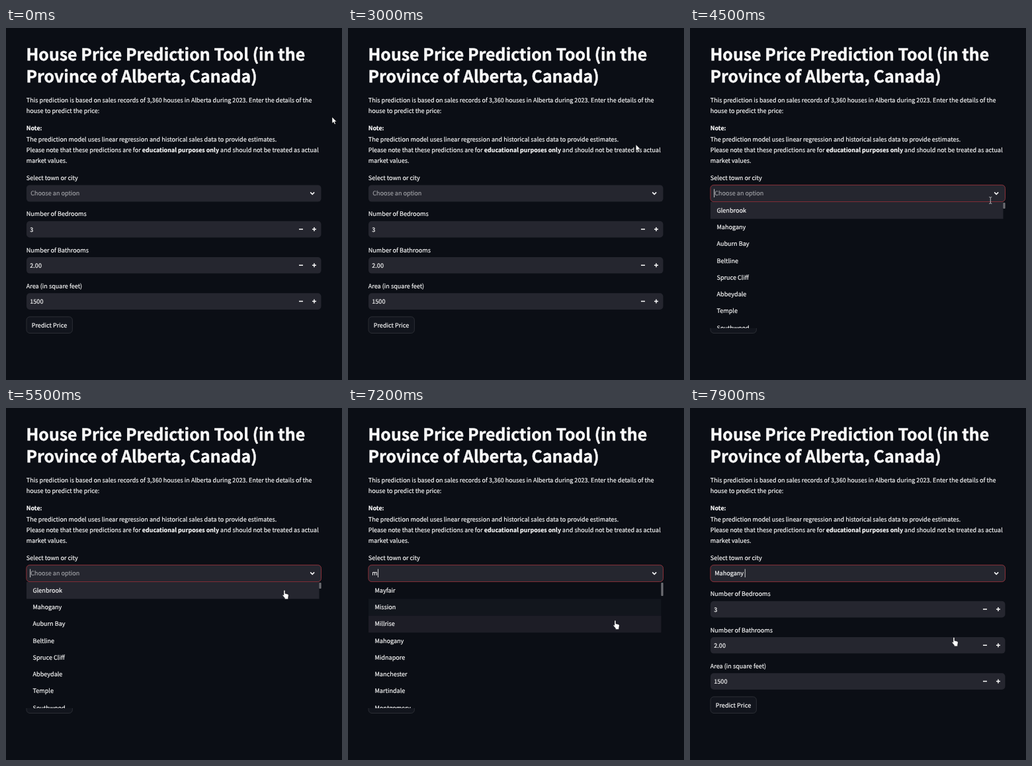
Animation, 508 px wide and 530 px high, one loop 8 s. Source, as an HTML page:

```html
<!DOCTYPE html>
<html lang="en">
<head>
<meta charset="utf-8">
<title>House price form</title>
<style>
  html, body { margin: 0; width: 100%; height: 100%; overflow: hidden; background: #0b0e15; }
  svg { display: block; }
  text { font: 9.08px "Noto Sans CJK JP", "Noto Sans CJK SC", "Noto Sans CJK", sans-serif; fill: #fafafa; stroke: #fafafa; stroke-width: .18; text-rendering: geometricPrecision; }
  .title { font-size: 24.94px; font-weight: 700; stroke-width: .45; }
  .bold { font-size: 8.95px; font-weight: 700; }
  .field { fill: #25262f; }
  .icon { fill: none; stroke: #fafafa; stroke-width: 1.5; }
</style>
</head>
<body>
<svg id="stage" width="508" height="530" viewBox="0 0 508 530"></svg>
<script>
const LOOP = 8000, FOCUS = 4400, OPEN = 4500, TYPED = 6000, CHOSEN = 7900;
const ROW = 25.4, LIST_TOP = 262;

const text = (x, y, s, attrs = '') => `<text x="${x}" y="${y}" ${attrs}>${s}</text>`;
const box = (x, y, w, h, attrs) => `<rect x="${x}" y="${y}" width="${w}" height="${h}" ${attrs}/>`;

const numberField = (y, label, value) =>
  text(30.8, y - 7.4, label) +
  box(31, y, 445.5, 24.6, 'rx="5" class="field"') +
  text(36.3, y + 15.9, value) +
  `<path class="icon" d="M443 ${y + 12.3}h6M463 ${y + 12.3}h6m-3 -3v6"/>`;

const options = (id, names) => `<g id="${id}">` +
  names.split(',').map((name, i) => text(40.5, 277.6 + i * 25.3, name)).join('') + '</g>';

const stage = document.getElementById('stage');
stage.innerHTML =
  text(30.4, 48.6, 'House Price Prediction Tool (in the', 'class="title"') +
  text(30.4, 81.8, 'Province of Alberta, Canada)', 'class="title"') +
  text(30.8, 111.5, 'This prediction is based on sales records of 3,360 houses in Alberta during 2023. Enter the details of the') +
  text(30.8, 127.8, 'house to predict the price:') +
  text(30.8, 154, 'Note:', 'class="bold"') +
  text(30.8, 170.6, 'The prediction model uses linear regression and historical sales data to provide estimates.') +
  text(30.8, 186.8, 'Please note that these predictions are for <tspan class="bold">educational purposes only</tspan> and should not be treated as actual') +
  text(30.8, 203, 'market values.') +
  text(30.8, 229, 'Select town or city') +
  numberField(290.8, 'Number of Bedrooms', '3') +
  numberField(345, 'Number of Bathrooms', '2.00') +
  numberField(399.3, 'Area (in square feet)', '1500') +
  box(31, 434.8, 69.4, 24.7, 'rx="5" fill="#12151d" stroke="#33353c" stroke-width=".8"') +
  text(38.7, 450.8, 'Predict Price') +
  box(30.9, 236.4, 445.6, 25.2, 'id="select" rx="5" class="field" stroke-width=".8"') +
  text(37.3, 252.3, '', 'id="value"') +
  box(0, 242.5, .8, 12.5, 'id="caret" fill="#fafafa"') +
  '<path class="icon" d="M460.2 247.4l3 3l3 -3"/>' +
  `<clipPath id="clip">${box(30, LIST_TOP, 448, 190)}</clipPath>
  <g id="list" clip-path="url(#clip)">
    ${box(30, LIST_TOP, 448, 190, 'fill="#0b0e15"')}
    ${[0, 1, 2, 3].map(i => box(31, LIST_TOP + i * ROW, 442.5, ROW, 'class="field hover"')).join('')}
    ${options('all', 'Glenbrook,Mahogany,Auburn Bay,Beltline,Spruce Cliff,Abbeydale,Temple,Southwood')}
    ${options('matches', 'Mayfair,Mission,Millrise,Mahogany,Midnapore,Manchester,Martindale,Montgomery')}
    ${box(473.4, 263, 3.2, 9, 'id="thumb" rx="1" fill="#6c6d72"')}
  </g>
  <g id="pointer">
    <path id="arrow" d="M0 0v9.6l2.2 -2l1.5 3.4l1.7 -.7l-1.5 -3.3h3z" fill="#fff" stroke="#000" stroke-width=".5"/>
    <path id="beam" d="M-2 -5q2 0 2 1.2q0 -1.2 2 -1.2M0 -4v8M-2 5q2 0 2 -1.2q0 1.2 2 1.2" fill="none" stroke="#c9c9cc" stroke-width=".9"/>
    <path id="hand" transform="translate(.6 .4) scale(1.1)" d="M-2.4 -5q0 -1.1 .9 -1.1t.9 1.1v3.6l3.4 .7q1.5 .4 1.4 1.8l-.6 3.3v1.8h-4.6v-1.3l-3 -3.7q-.4 -1.2 .7 -1.1l.9 .8z" fill="#fff" stroke="#000" stroke-width=".4"/>
  </g>`;

const el = id => document.getElementById(id);
const show = (id, on) => el(id).setAttribute('display', on ? 'inline' : 'none');
const clamp = v => Math.min(1, Math.max(0, v));

// time, x, y
const path = [
  [0, 493, 134], [700, 246, 124], [1100, 246, 124], [1400, 228, 128.5], [1600, 228, 128.5],
  [1700, 226, 129], [1800, 219, 129], [1900, 219, 129], [2800, 443, 154], [3300, 421, 215],
  [3400, 421, 215], [3900, 470, 243], [4200, 467, 252], [4400, 467, 252], [4700, 418, 281],
  [4900, 418, 281], [5000, 419, 282], [5100, 419, 282], [5200, 422, 280.5], [6700, 422, 280.5],
  [6800, 410, 300.5], [7600, 400, 351.5], [LOOP, 400, 351.5]
];
// when each of the first four rows becomes the hovered one
const hoverStart = [OPEN, 6800, 7100, 7350, LOOP];

function pointerAt(t) {
  const i = path.findIndex(p => p[0] > t);
  const [t0, x0, y0] = path[i - 1], [t1, x1, y1] = path[i];
  const u = (t - t0) / (t1 - t0), k = u * u * (3 - 2 * u);
  return [x0 + (x1 - x0) * k, y0 + (y1 - y0) * k];
}

function draw(t) {
  const open = t >= OPEN && t < CHOSEN, typed = t >= TYPED, chosen = t >= CHOSEN;
  show('list', open);
  show('all', !typed);
  show('matches', typed);
  el('thumb').setAttribute('height', typed ? 20 : 9);
  el('select').setAttribute('stroke', t >= OPEN ? '#a8363f' : 'none');

  const value = el('value');
  value.textContent = chosen ? 'Mahogany' : typed ? 'm' : 'Choose an option';
  value.setAttribute('x', typed && !chosen ? 36.3 : 37.2);
  value.style.fill = value.style.stroke = typed ? '#fafafa' : '#9b9ca1';

  // the caret restarts its blink with every edit
  const edited = [CHOSEN, TYPED, OPEN, FOCUS].find(start => t >= start);
  el('caret').setAttribute('x', chosen ? 82.8 : typed ? 45 : 36.3);
  show('caret', (t - edited) % 1000 < 500);

  const fade = start => clamp((t - start + 70) / 250);
  document.querySelectorAll('.hover').forEach((row, i) => {
    const shown = i ? fade(hoverStart[i]) : 1;
    row.setAttribute('opacity', shown - fade(hoverStart[i + 1]));
  });

  const [x, y] = pointerAt(t);
  el('pointer').setAttribute('transform', `translate(${x} ${y})`);
  const hand = t >= OPEN && y > LIST_TOP, beam = !hand && y > 234;
  show('hand', hand);
  show('beam', beam);
  show('arrow', !hand && !beam);
}

// the screen refreshes ten times a second
function tick() {
  draw(Math.floor(performance.now() % LOOP / 100) * 100);
  requestAnimationFrame(tick);
}
tick();
</script>
</body>
</html>
```
